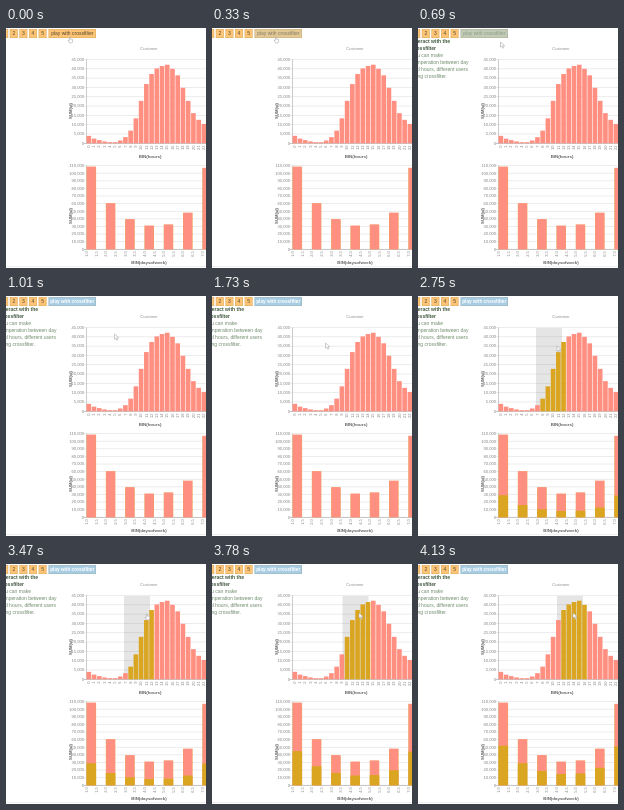
These frames come from a looping animation (200x240 px, 4460 ms). An HTML page with a canvas:

```html
<!DOCTYPE html>
<html lang="en">
<head>
<meta charset="utf-8">
<title>Crossfilter bar charts</title>
<style>
html, body { margin: 0; width: 100%; height: 100%; overflow: hidden; background: #fff; }
canvas { display: block; width: 200px; height: 240px; }
</style>
</head>
<body>
<canvas id="stage" width="200" height="240"></canvas>
<script>
const ctx = document.getElementById('stage').getContext('2d');
const FONT = '"Liberation Sans", Arial, sans-serif';
const LOOP = 4460;
const SALMON = '#ff8f80', GOLD = '#daa520', ORANGE = '#fcc474', BLUE = '#a8cde2';
const INK = '#54452f', LABEL = '#828282', TITLE = '#606060';

const LEFT = 80, STEP = 5.23;
const hours = { top: 31.5, base: 115.3, max: 45, unit: 5 };
const days = { top: 137.6, base: 221.3, max: 110, unit: 10 };
const hourSums = [4, 2.5, 1.7, 1, .6, .6, 1.5, 3.3, 6.8, 13.4, 22.8, 31.8, 37.2, 40.2, 41.5, 42.2,
  40, 36.5, 29.8, 22.8, 16.2, 12.6, 10.4];
const daySums = [108.5, 60.5, 39.5, 31, 32.5, 48, 107];

// Each step holds until the next: start, cursor [shape, x, y], brush [from, to].
const steps = [
  { at: 0, cursor: ['hand', 62, 9], fill: ORANGE, ink: INK },
  { at: 330, cursor: ['hand', 62, 9], fill: '#e2c894', ink: '#837b65' },
  { at: 690, cursor: ['arrow', 82.5, 14], fill: '#c1cbb5', ink: '#8f9c84' },
  { at: 1010, cursor: ['arrow', 108.5, 38] },
  { at: 1340, cursor: ['arrow', 121, 48] },
  { at: 1730, cursor: ['arrow', 113.5, 47] },
  { at: 2060, cursor: ['arrow', 134, 50], brush: [118, 138] },
  { at: 2420, cursor: ['arrow', 138, 50], brush: [118, 142.6] },
  { at: 2750, cursor: ['arrow', 139, 50], brush: [118, 144] },
  { at: 3100, cursor: ['hand', 136, 50], brush: [118, 144] },
  { at: 3470, cursor: ['hand', 139, 50], brush: [118, 144] },
  { at: 3780, cursor: ['arrow', 147, 49], brush: [130.5, 156.5] },
  { at: 4130, cursor: ['arrow', 155, 49], brush: [139, 165] }
];

function rect(x, y, w, h, color) {
  ctx.fillStyle = color;
  ctx.fillRect(x, y, w, h);
}

function text(str, x, y, size, color, align = 'center', weight = 'normal') {
  ctx.font = `${weight} ${size}px ${FONT}`;
  ctx.fillStyle = color;
  ctx.textAlign = align;
  ctx.textBaseline = 'alphabetic';
  ctx.fillText(str, x, y);
}

function turned(str, x, y, size, color, align, weight) {
  ctx.save();
  ctx.translate(x, y);
  ctx.rotate(-Math.PI / 2);
  text(str, 0, 0, size, color, align, weight);
  ctx.restore();
}

function button(x, w, label, fill, ink, weight) {
  rect(x, 1, w, 9, fill);
  ctx.strokeStyle = 'rgba(120, 100, 60, .22)';
  ctx.lineWidth = .6;
  ctx.strokeRect(x + .3, 1.3, w - .6, 8.4);
  text(label, x + w / 2, 7.2, weight ? 4.7 : 5, ink, 'center', weight);
}

function toolbar(step) {
  for (let i = 0; i < 5; i++) button(-5.8 + i * 9.6, 8, String(i + 1), ORANGE, INK);
  const idle = !step.fill;
  button(42.5, 47.5, 'play with crossfilter', step.fill || BLUE, step.ink || '#fff', idle ? 'bold' : undefined);
}

function note() {
  const dark = '#41593f', soft = '#6f8c6c';
  text('Interact with the', 32, 15, 5, dark, 'right', 'bold');
  text('crossfilter', 18, 22, 5, dark, 'right', 'bold');
  text('You can make', 25, 29, 5, soft, 'right');
  text('comperation between day', 50.5, 36, 5, soft, 'right');
  text('and hours, different users', 50, 43, 5, soft, 'right');
  text('using crossfilter.', 29, 50, 5, soft, 'right');
}

const height = (chart, value) => (chart.base - chart.top) * value / chart.max;

function grid(chart) {
  for (let v = 0; v <= chart.max; v += chart.unit) {
    const y = chart.base - height(chart, v);
    rect(LEFT - 2, y - .35, 122, .7, v ? '#e4e4e4' : '#a8a8a8');
    text(v ? v + ',000' : '0', 78, y + 1.3, 4.1, LABEL, 'right');
  }
  rect(LEFT, chart.top, .6, chart.base - chart.top, '#aaa');
}

function bar(chart, x, w, value, color) {
  const h = height(chart, value);
  rect(x, chart.base - h, w, h, color);
}

function charts(brush) {
  const left = i => LEFT + i * STEP;
  const chosen = i => brush && left(i) >= brush[0] && left(i) <= brush[1];

  grid(hours);
  if (brush) rect(brush[0], 32, brush[1] - brush[0], 83, 'rgba(51, 51, 51, .125)');
  let total = 0, picked = 0;
  hourSums.forEach((v, i) => {
    total += v;
    if (chosen(i)) picked += v;
    bar(hours, left(i) + .5, STEP - .6, v, chosen(i) ? GOLD : SALMON);
    turned(String(i), left(i) + 4, 117.5, 4, LABEL, 'right');
  });
  text('Customer', 143, 22, 4, '#8a8a8a');
  text('BIN(hours)', 144, 130, 4.4, TITLE, 'center', 'bold');
  turned('SUM(id)', 65.5, 83, 4.2, TITLE, 'center', 'bold');

  grid(days);
  daySums.forEach((v, i) => {
    const x = 80.5 + i * 19.3;
    bar(days, x, 9.6, v, '#e9a860');
    bar(days, x + .4, 8.8, v, SALMON);
    if (brush) bar(days, x, 9.6, v * picked / total, GOLD);
  });
  for (let i = 0; i < 13; i++) {
    turned((1 + i / 2).toFixed(1), 82.2 + i * 9.62, 223.3, 4, LABEL, 'right');
  }
  text('BIN(daysofweek)', 143, 236, 4.4, TITLE, 'center', 'bold');
  turned('SUM(id)', 65.5, 188, 4.2, TITLE, 'center', 'bold');
  rect(0, 238, 200, 1, '#eee');
}

const shapes = {
  arrow: [[0, 0], [0, 5.2], [1.3, 4.1], [2.3, 6.2], [3.3, 5.7], [2.4, 3.8], [4.2, 3.7]],
  hand: [[1.3, 0], [2.2, 0], [2.2, 2], [4.7, 2.5], [4.5, 5], [3.8, 6], [1.8, 6], [0, 3.3], [1.3, 3.4]]
};

function pointer([shape, x, y]) {
  ctx.beginPath();
  for (const [dx, dy] of shapes[shape]) ctx.lineTo(x + dx, y + dy);
  ctx.closePath();
  ctx.fillStyle = '#fff';
  ctx.fill();
  ctx.strokeStyle = '#aaa';
  ctx.lineWidth = .6;
  ctx.stroke();
}

const start = performance.now();

function draw() {
  const t = (performance.now() - start) % LOOP;
  const step = steps.filter(s => s.at <= t).pop();
  rect(0, 0, 200, 240, '#fff');
  charts(step.brush);
  toolbar(step);
  if (t >= 690) note();
  pointer(step.cursor);
  requestAnimationFrame(draw);
}
draw();
</script>
</body>
</html>
```
